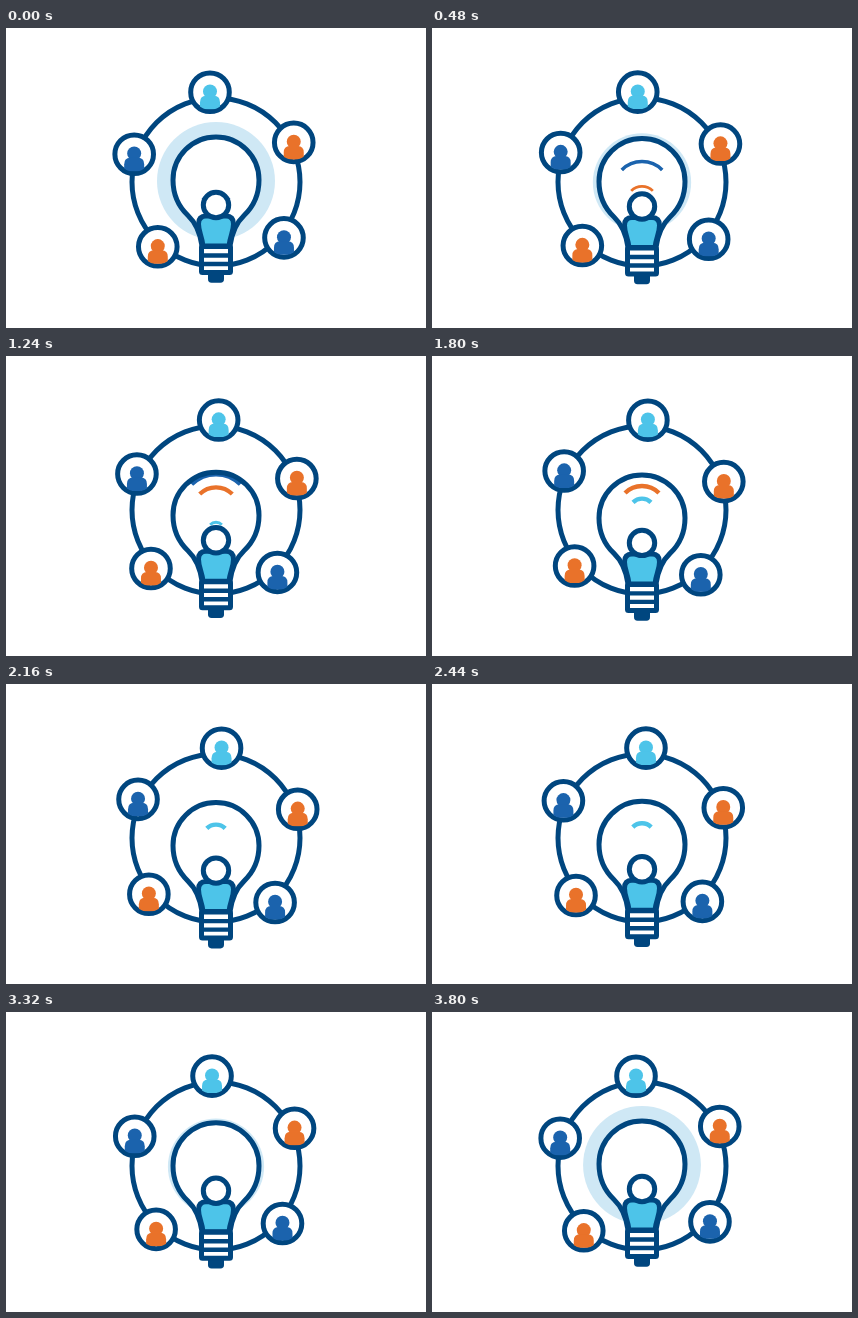
These frames come from a looping animation (420x300 px, 3.84 s). An HTML page:

```html
<!DOCTYPE html>
<html lang="en">
<head>
<meta charset="utf-8">
<title>Connected ideas</title>
<style>
  html, body { margin: 0; width: 100%; height: 100%; overflow: hidden; background: #fff; }
  svg { display: block; width: 420px; height: 300px; }
  .line { stroke: #00467f; stroke-width: 5; stroke-linejoin: round; }
  .wave { fill: none; stroke-width: 4.4; }
</style>
</head>
<body>
<svg viewBox="0 0 420 300">
  <defs>
    <clipPath id="disc"><circle r="17.5"/></clipPath>
    <path id="glass" d="M196 218C194 204 190 195 182 187.500C172 178 167 165 167 152A43 43 0 0 1 253 152C253 165 248 178 238 187.500C230 195 226 204 224 218Z"/>
    <clipPath id="inside"><use href="#glass"/></clipPath>
  </defs>
  <circle id="halo" cx="210" fill="#cfe8f5"/>
  <circle class="line" cx="210" cy="154" r="84" fill="none"/>
  <g id="nodes"></g>
  <g id="bulb">
    <use href="#glass" fill="#fff"/>
    <g id="waves" clip-path="url(#inside)"></g>
    <use href="#glass" class="line" fill="none"/>
    <path class="line" fill="#4dc4e9" d="M197 218C196 208 192.500 204 192.500 196Q192.500 188 200 188H220Q227.500 188 227.500 196C227.500 204 224 208 223 218Z"/>
    <circle class="line" cx="210" cy="177" r="12.700" fill="#fff"/>
    <path d="M202 244H218V251Q218 254.800 214.500 254.800H205.500Q202 254.800 202 251Z" fill="#00467f"/>
    <rect class="line" x="195.500" y="218.500" width="29" height="26" rx="1" fill="#fff"/>
    <path class="line" style="stroke-width:4.400" d="M195 227.500H225M195 236H225"/>
  </g>
</svg>
<script>
const LOOP = 3840;
const CYAN = '#4dc4e9', ORANGE = '#e9722a', BLUE = '#1b63ad';
const $ = id => document.getElementById(id);
const clamp = v => Math.min(1, Math.max(0, v));
const mix = (a, b, k) => a + (b - a) * k;
const smooth = k => (1 - Math.cos(Math.PI * k)) / 2;

function add(parent, name, attrs) {
  const el = document.createElementNS('http://www.w3.org/2000/svg', name);
  for (const key in attrs) el.setAttribute(key, attrs[key]);
  return parent.appendChild(el);
}

// Offsets from the pivot at (210, 149)
const nodes = [
  [0, -85, CYAN], [80, -29, ORANGE], [63.5, 65.5, BLUE],
  [-63, 65.5, ORANGE], [-80, -28.5, BLUE]
].map(([x, y, fill]) => {
  const el = add($('nodes'), 'g', {});
  add(el, 'circle', { class: 'line', r: 19.3, fill: '#fff' });
  const person = add(el, 'g', { fill, 'clip-path': 'url(#disc)' });
  add(person, 'circle', { cy: -0.7, r: 7 });
  add(person, 'path', { d: 'M-10 17V10Q-10 3.500 -4 3.500H4Q10 3.500 10 10V17Z' });
  return { el, x, y };
});

// Radius, resting top, start, travel time, fade start
const waves = [
  [BLUE, 35, 109, 0, 1850, 1300],
  [ORANGE, 24, 120, 370, 1570, 1900],
  [CYAN, 13, 131, 1170, 1000, 2550]
].map(([stroke, r, top, start, travel, fade]) => {
  const h = r * Math.SQRT1_2;
  const d = `M${-h} ${r - h}A${r} ${r} 0 0 1 ${h} ${r - h}`;
  return { el: add($('waves'), 'path', { class: 'wave', stroke, d }), top, start, travel, fade };
});

function draw(t) {
  const swing = Math.cos(2 * Math.PI * t / LOOP);
  const drop = 5 - 5 * swing;

  const a = -4.05 * swing * Math.PI / 180;
  const c = Math.cos(a), s = Math.sin(a);
  for (const { el, x, y } of nodes)
    el.setAttribute('transform', `translate(${210 + x * c - y * s} ${149 + x * s + y * c})`);

  $('bulb').setAttribute('transform', `translate(0 ${drop})`);

  const glow = smooth(clamp(1 - Math.min(t, LOOP - t) / 800));
  $('halo').setAttribute('cy', 153 + drop);
  $('halo').setAttribute('r', mix(44, 59, glow));

  for (const { el, top, start, travel, fade } of waves) {
    const k = 1 - (1 - clamp((t - start) / travel)) ** 3;
    el.setAttribute('transform', `translate(210 ${mix(166, top, k)}) scale(${mix(0.55, 1, k)})`);
    el.setAttribute('opacity', t < start ? 0 : 1 - clamp((t - fade) / 250));
  }
}

const t0 = performance.now();
function tick() {
  draw((performance.now() - t0) % LOOP);
  requestAnimationFrame(tick);
}
tick();
</script>
</body>
</html>
```
